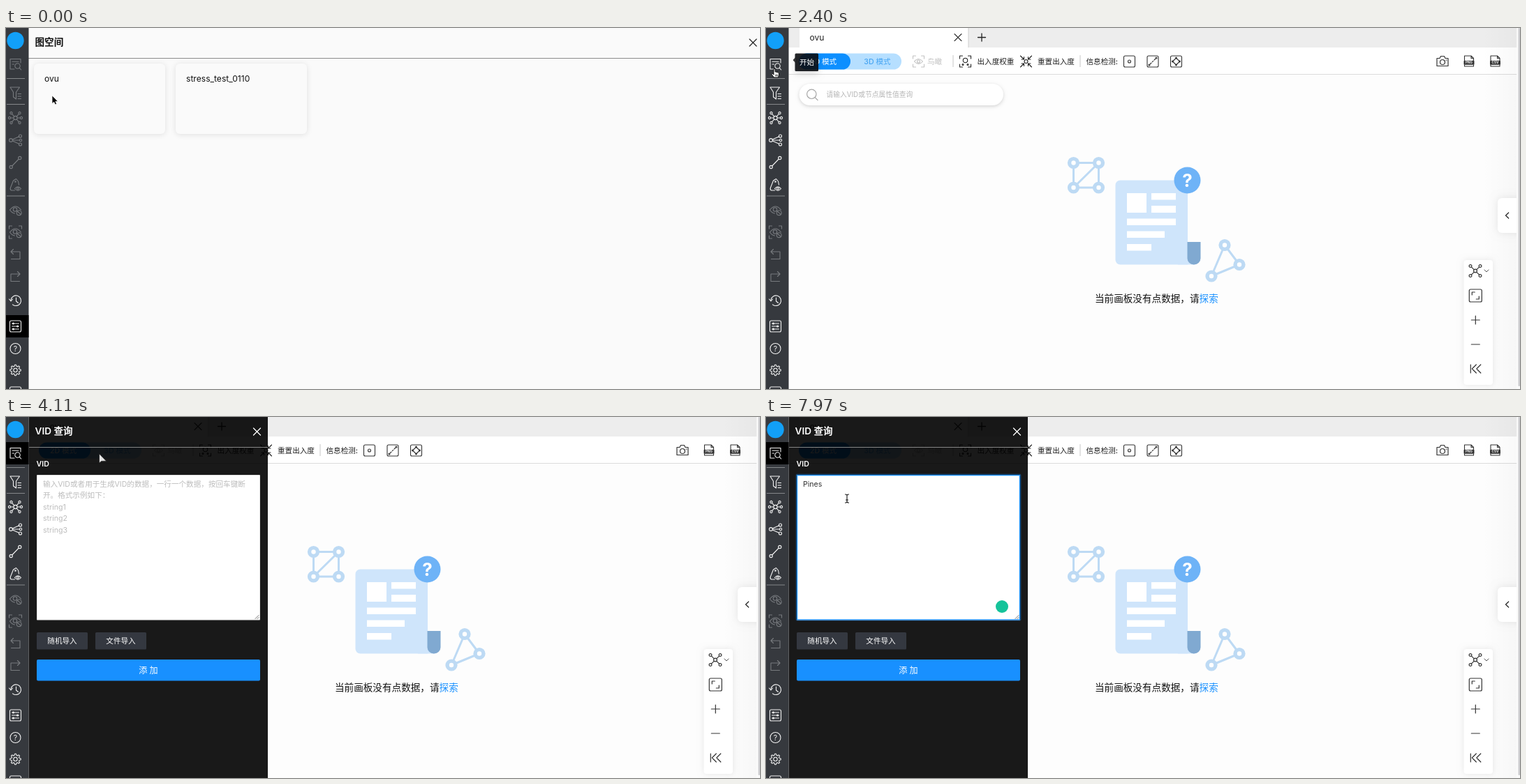
These frames come from a looping animation (1080x518 px, 8000 ms). An HTML page with a canvas:

```html
<!DOCTYPE html>
<html lang="zh-CN">
<head>
<meta charset="utf-8">
<title>图空间</title>
<style>
  html, body { margin: 0; width: 100%; height: 100%; overflow: hidden; background: #fdfdfd; }
  canvas { display: block; width: 1080px; height: 518px; }
</style>
</head>
<body>
<canvas id="stage"></canvas>
<script>
const W = 1080, H = 518, LOOP = 8000;
const canvas = document.getElementById('stage');
const dpr = window.devicePixelRatio || 1;
canvas.width = W * dpr;
canvas.height = H * dpr;
const g = canvas.getContext('2d');

const FAMILY = 'Inter, "Noto Sans CJK SC", "Noto Sans CJK", sans-serif';
const BLUE = '#1890ff', SIDE = '#36393e', INK = '#222';
const SPACE = 'ovu', WORD = 'Pines';
const KEYS = [5900, 6060, 6240, 6420, 6680];
const ENTER = 7270;

const clamp = v => Math.max(0, Math.min(1, v));
const span = (t, a, b) => clamp((t - a) / (b - a));
const ease = p => p * p * (3 - 2 * p);
const mix = (a, b, p) => a + (b - a) * p;

function fill(x, y, w, h, color, r = 0) {
  g.fillStyle = color;
  g.beginPath();
  g.roundRect(x, y, w, h, r);
  g.fill();
}

function shadowBox(x, y, w, h, color, r, alpha, blur, dy = 0) {
  g.save();
  g.shadowColor = `rgba(0,0,0,${alpha})`;
  g.shadowBlur = blur * dpr;
  g.shadowOffsetY = dy * dpr;
  fill(x, y, w, h, color, r);
  g.restore();
}

function text(s, x, y, size, color, weight = 400, align = 'left') {
  g.font = `${weight} ${size}px ${FAMILY}`;
  g.fillStyle = color;
  g.textAlign = align;
  g.textBaseline = 'alphabetic';
  g.fillText(s, x, y + size * 0.36);
}

function line(d, x, y, color, width = 1.1, inside) {
  const p = new Path2D(d);
  g.save();
  g.translate(x, y);
  g.lineCap = g.lineJoin = 'round';
  if (inside) {
    g.fillStyle = inside;
    g.fill(p);
  }
  g.strokeStyle = color;
  g.lineWidth = width;
  g.stroke(p);
  g.restore();
}

function disc(x, y, r, color) {
  g.fillStyle = color;
  g.beginPath();
  g.arc(x, y, r, 0, 7);
  g.fill();
}

const ring = (x, y, r) => `M${x - r} ${y}a${r} ${r} 0 1 0 ${2 * r} 0a${r} ${r} 0 1 0 ${-2 * r} 0`;
const box = (r, k = 2) => `M${-r + k} ${-r}H${r - k}Q${r} ${-r} ${r} ${-r + k}V${r - k}Q${r} ${r} ${r - k} ${r}` +
  `H${-r + k}Q${-r} ${r} ${-r} ${r - k}V${-r + k}Q${-r} ${-r} ${-r + k} ${-r}`;
const corners = (r, k) => `M${-r} ${-r + k}V${-r}H${-r + k}M${r - k} ${-r}H${r}V${-r + k}` +
  `M${r} ${r - k}V${r}H${r - k}M${-r + k} ${r}H${-r}V${r - k}`;

function spokes(ends, hub, tip) {
  return ring(0, 0, hub) + ends.map(([x, y]) => {
    const d = Math.hypot(x, y), a = hub / d, b = 1 - tip / d;
    return `M${x * a} ${y * a}L${x * b} ${y * b}` + ring(x, y, tip);
  }).join('');
}

function gear() {
  let d = '';
  for (let i = 0; i <= 96; i++) {
    const a = i / 96 * Math.PI * 2, r = 6.7 + 1.1 * Math.tanh(2 * Math.cos(a * 8));
    d += `${i ? 'L' : 'M'}${r * Math.cos(a)} ${r * Math.sin(a)}`;
  }
  return d + ring(0, 0, 2.7);
}

const EYE = 'M-8 0Q0 -10 8 0M-8 0Q-5 4.5 -1 5' + ring(-0.5, -0.5, 2.7) + ring(5.2, 4.2, 3.4) + 'M2.8 2L7.6 6.4';
const CROSS = 'M-5 -5L5 5M5 -5L-5 5';
const PLUS = 'M-5.5 0H5.5M0 -5.5V5.5';
const NET = spokes([[-7, -7], [7, -7], [-7, 7], [7, 7]], 2.4, 1.9);

// [y, path, group]: 0 needs a space, 1 stays dim, 2 is always on
const ICONS = [
  [52, 'M-1.5 7H-7.5V-7.5H7.5V-2M-4.5 -3.7H4.5M-4.5 0H-2' + ring(3, 2.5, 3.7) + 'M5.6 5.2L8.2 8', 0],
  [93, 'M-7.5 -8H6L1 -1V9L-3 6V-1ZM3.5 1.5H8M3.5 5H8M3.5 8.5H8', 0],
  [129, spokes([[-6, -7], [6, -7], [-6, 7], [6, 7], [-8.5, 0], [8.5, 0]], 2.6, 1.6), 0],
  [161, ring(-6.5, 0, 2.4) + ring(7, -6, 2) + ring(7.5, 0, 1.7) + ring(7, 6, 2) +
    'M-4.3 -1L5.2 -5.2M-4.1 0H5.8M-4.3 1L5.2 5.2', 0],
  [193, ring(-6.3, 6.5, 2.1) + ring(6.3, -6.5, 2.1) + 'M-4.8 5L4.8 -5', 0],
  [225, 'M-1 8H-6Q-8 7 -7 4L-3 -6L1 -8.5L4 -5L5 0' + ring(0, -4.5, 0.8) +
    'M-1 5.5Q3.5 0 8 5.5Q3.5 11 -1 5.5' + ring(3.5, 5.5, 1.5), 0],
  [261, EYE, 1],
  [293, EYE + 'M-9 -5V-9H-5M5 -9H9V-5M-9 5V9H-5', 1],
  [325, 'M-3 -7.5L-6.5 -4L-3 -.5M-6.5 -4H6.5V6.5H-6', 1],
  [357, 'M3 -7.5L6.5 -4L3 -.5M6.5 -4H-6.5V6.5H6', 1],
  [391, 'M-6.5 -1A7.3 7.3 0 1 1 -4 5.8M-9 -2L-6.5 .8L-4 -2M1 -4V1L4 3.5', 2],
  [428, box(8, 2) + 'M-5 -4H5M-5 0H5M-5 4H5' + ring(-3, -4, 1) + ring(3, 0, 1) + ring(-3, 4, 1), 2],
  [460, ring(0, 0, 7.5), 2],
  [491, gear(), 2],
  [523, box(8, 2), 2]
];

function sidebar(ready, active) {
  fill(0, 0, 32.5, H, SIDE);
  if (active) fill(0, active - 16, 32.5, 32, '#000');
  disc(13.5, 18, 12.2, '#12a0f8');
  for (const y of [72.5, 109.5, 241]) fill(1, y - 0.5, 26, 1, '#85878a');
  for (const [y, d, group] of ICONS) {
    const on = group === 2 || (group === 0 && ready);
    line(d, 13.5, y, on ? '#f2f2f2' : '#777a7e', 1.1);
  }
  text('?', 13.5, 460, 10.5, '#f2f2f2', 400, 'center');
}

function spaceList() {
  fill(0, 0, W, H, '#fafafa');
  text('图空间', 41.5, 20, 13.6, '#111', 700);
  fill(32, 43, W - 32, 1, '#8c8c8c');
  line(CROSS, 1070, 21, '#222', 1.2);
  [[40, SPACE], [243, 'stress_test_0110']].forEach(([x, name]) => {
    shadowBox(x, 51, 188, 101, '#fafafa', 6, 0.11, 8, 1);
    text(name, x + 15, 73, 12.1, '#111');
  });
  sidebar(false, 428);
}

function nodes(points, edges) {
  const c = '#bddaf4';
  line(edges, 0, 0, c, 3);
  for (const [x, y] of points) {
    disc(x, y, 8.6, c);
    disc(x, y, 3.2, '#fff');
  }
}

function emptyArt() {
  nodes([[440.5, 193.5], [476.5, 193.5], [440.5, 229], [476.5, 229]],
    'M440.5 193.5H476.5V229H440.5ZM476.5 193.5L440.5 229');
  nodes([[657, 311.5], [678, 339.5], [638, 356]], 'M657 311.5L678 339.5L638 356Z');
  fill(500.5, 218.5, 103.5, 121, '#cfe5fb', [7, 0, 0, 7]);
  fill(590, 325, 23, 14.5, '#cfe5fb');
  fill(603.5, 307, 19, 32.5, '#80a9d1', [0, 0, 9, 9]);
  const rows = [[517, 237, 28, 28], [552, 237, 35, 9.5], [552, 255, 35, 10],
    [517, 273.5, 70, 9.5], [517, 291.5, 54, 9.5], [517, 310, 35, 9.5]];
  for (const r of rows) fill(...r, '#fff');
  disc(603.5, 218.5, 19, '#6eb3f7');
  text('?', 603.5, 218.5, 26, '#fff', 700, 'center');
  text('当前画板没有点数据，请', 471, 388, 13.6, '#111', 500);
  text('探索', 620.6, 388, 13.6, BLUE, 500);
}

function fileIcon(x, label) {
  line('M-6.5 -1V-7.5H3L6.5 -4V-1M3 -7.5V-4H6.5M-6.5 5V7.5H6.5V5', x, 47.5, '#333');
  fill(x - 7.5, 46.8, 15, 6, '#333', 1);
  text(label, x, 49.8, 4.6, '#fff', 700, 'center');
}

function toolbar() {
  fill(32.5, 28, 1043, 38.5, '#fff');
  fill(32.5, 66, 1043, 1, '#dcdcdc');
  fill(47, 36.5, 147, 23, '#b6dfff', 11.5);
  fill(47, 36.5, 74, 23, '#0d8fff', 11.5);
  text('2D 模式', 82, 48, 10.6, '#fff', 500, 'center');
  text('3D 模式', 159.5, 48, 10.6, '#46a5f3', 500, 'center');
  const pale = '#c2c2c2';
  line(corners(8, 4) + 'M-6 0Q0 -7 6 0Q0 7 -6 0' + ring(0, 0, 2), 218.5, 48, pale);
  text('鸟瞰', 231, 48, 10.6, pale);
  fill(267.5, 39, 1, 17, '#c8c8c8');
  line(corners(8, 4) + ring(0, -1.5, 3.2) + ring(-3.5, 4.5, 1) + ring(3.5, 4.5, 1), 285.5, 48, INK);
  text('出入度权重', 302.5, 48, 10.6, INK, 500);
  line(ring(0, 0, 2.5) + 'M-8 -8L-3 -3M-3 -6.5V-3H-6.5M8 -8L3 -3M3 -6.5V-3H6.5' +
    'M-8 8L-3 3M-3 6.5V3H-6.5M8 8L3 3M3 6.5V3H6.5', 372.5, 48, INK);
  text('重置出入度', 389, 48, 10.6, INK, 500);
  fill(449.5, 39, 1, 17, '#c8c8c8');
  text('信息检测:', 458.5, 48, 10.6, INK, 500);
  line(box(8, 2) + ring(0, 0, 2), 520.5, 48, '#333');
  line(box(8, 2) + ring(-5, 5, 1) + ring(5, -5, 1) + 'M-3.5 3.5L-2 2M-.7 .7L.7 -.7M2 -2L3.5 -3.5', 554, 48, '#333');
  line(box(8, 2) + 'M0 -5L5 0L0 5L-5 0Z' + ring(0, -5, 0.9) + ring(0, 5, 0.9) + ring(-5, 0, 0.9) + ring(5, 0, 0.9), 587.5, 48, '#333');
  line('M-8 -4.5H-4L-2.5 -7.5H2.5L4 -4.5H8V6.5H-8Z' + ring(0, 1, 3.5) + 'M5 -2H6', 969, 48, '#333', 1.2);
  fileIcon(1007, 'PNG');
  fileIcon(1044.5, 'CSV');
}

function workspace(t) {
  const p = ease(span(t, 900, 1070));
  fill(0, 0, W, H, '#fdfdfd');
  fill(32.5, 0, 1043, 28, '#ededed');
  fill(48, 0, 241.5, 28, '#fff');
  fill(289.5, 0, 1, 28, '#d2d2d2');
  text(SPACE, 62.5, 13.5, 12.1, INK);
  line(CROSS, 275, 13.5, '#333', 1.1);
  line(PLUS, 309, 13.5, '#222', 1.3);
  toolbar();

  shadowBox(47.5, 80, 292.5, 31, '#fff', 15.5, 0.17, 5, 1.5);
  const sx = mix(65, 66, p);
  line(ring(-0.7, -0.7, 6.7) + 'M4.2 4.2L8 8', sx, 95.5, p < 1 ? '#c5c5c5' : '#a6a6a6', 1.2);
  text('请输入VID或节点属性值查询', 86.5, 95.7, 9.75, '#b5b5b5');
  emptyArt();

  const shade = g.createLinearGradient(1026, 0, 1075, 0);
  shade.addColorStop(0, 'rgba(0,0,0,0)');
  shade.addColorStop(1, `rgba(0,0,0,${0.022 * p})`);
  g.fillStyle = shade;
  g.fillRect(1026, 0, 49, H);
  const hx = mix(1057, 1048, p);
  g.save();
  g.beginPath();
  g.rect(1000, 200, 75, 140);
  g.clip();
  shadowBox(hx, 244, 40, 50, '#fff', 6, 0.09, 12);
  g.restore();
  line('M2.2 -4L-2 0L2.2 4', mix(1069, 1061.5, p), 269, '#222', 1.2);

  shadowBox(999.5, 333, 41.5, 179, '#fff', 4, 0.09, 9);
  line(NET, 1016, 348.5, '#333', 1.2);
  line('M-3 -1.5L0 1.5L3 -1.5', 1032, 348.5, '#555', 1);
  line(box(9, 2) + 'M-5 -1V-5H-1M5 1V5H1', 1016.3, 384, '#333', 1.2);
  line('M-6 0H6M0 -6V6', 1016.3, 419, '#333', 1.2);
  line('M-6 0H6', 1016.3, 454, '#333', 1.2);
  line('M-7 -6V6M1 -6L-5 0L1 6M7.5 -6L1.5 0L7.5 6', 1016.3, 489, '#333', 1.2);
  fill(1075.5, 0, 4.5, H, '#fafafa');
  fill(1077.5, 0, 2.5, 514, '#cdcdd0', 1);
}

function tooltip(alpha) {
  if (!alpha) return;
  g.save();
  g.globalAlpha = alpha;
  shadowBox(41.5, 36.5, 33.5, 25.5, 'rgba(12,14,18,.9)', 1.5, 0.12, 9, 5);
  line('M0 -3L-2.5 0L0 3Z', 41.5, 46, '#222', 0.5, '#222');
  text('开始', 48, 49.2, 10.6, '#fff');
  g.restore();
}

function menu() {
  shadowBox(32.5, 36.5, 230.5, 96.5, SIDE, 0, 0.15, 5, 1);
  ['VID 查询', 'Tag 查询', '子图查询'].forEach((s, i) => {
    const y = 52.5 + i * 32.6;
    if (i) fill(32.5, y - 16.5, 230.5, 1, '#1c1e21');
    text(s, 41.5, y, 12.1, '#fff', 500);
    line('M-2 -4L2 0L-2 4', 252, y, '#f0f0f0', 1.2);
  });
}

function button(s, x) {
  fill(x, 309, 73, 24.5, '#343840', 1.5);
  text(s, x + 36.5, 321.3, 10.6, '#fff', 500, 'center');
}

function caret(t, typed) {
  const events = [5080, ...KEYS, ENTER].filter(k => k <= t);
  if (!events.length) return;
  const since = t - events[events.length - 1];
  if (since % 1080 >= 540) return;
  g.font = `400 10.6px ${FAMILY}`;
  const second = t >= ENTER;
  const x = 53 + (second ? 0 : g.measureText(typed).width);
  fill(x, second ? 104.5 : 88, 1, 15, '#222');
}

function panel(t) {
  fill(32.5, 0, 342.5, H, 'rgba(0,0,0,.9)');
  fill(32.5, 43, 342.5, 1, '#858585');
  text('VID 查询', 41.5, 20.5, 13.6, '#fff', 600);
  line(CROSS, 359.5, 21, '#fff', 1.3);
  text('VID', 43.5, 67.5, 10.6, '#fff', 600);

  const hover = span(t, 4650, 4880), focus = span(t, 5060, 5150);
  if (focus) fill(42.5, 81.5, 323, 211, `rgba(24,144,255,${0.3 * focus})`, 2);
  fill(44, 83, 320, 208.5, '#d9d9d9', 1);
  if (hover) fill(44, 83, 320, 208.5, `rgba(24,144,255,${hover})`, 1);
  const edge = mix(0.7, 1.2, focus);
  fill(44 + edge, 83 + edge, 320 - 2 * edge, 208.5 - 2 * edge, '#fff');
  line('M0 5L5 0M3 5L5 3', 357, 284.5, '#666', 0.9);

  const typed = WORD.slice(0, KEYS.filter(k => k <= t).length);
  if (typed) {
    text(typed, 53, 95.7, 10.6, '#333');
    disc(338, 272, 9 * ease(span(t, 5960, 6300)), '#15c39a');
  } else {
    ['输入VID或者用于生成VID的数据，一行一个数据，按回车键断', '开。格式示例如下：', 'string1', 'string2', 'string3']
      .forEach((s, i) => text(s, 53, 95.7 + i * 16.65, 10.6, '#bcbcbc'));
  }
  caret(t, typed);

  button('随机导入', 44);
  button('文件导入', 128);
  fill(44, 348, 320, 30.5, BLUE, 2);
  text('添 加', 204, 363.3, 12.1, '#fff', 500, 'center');
}

function arrow(x, y, light) {
  line(light ? 'M0 0V13L3.2 10.4L10 10.2Z' : 'M0 0V11.5L2.7 9.2L4.5 13L6.6 12L4.9 8.4H8.3Z',
    x, y, light ? '#222' : '#fff', 0.8, light ? '#e4e4e4' : '#000');
}

function hand(x, y) {
  line('M-1 7V1Q0 -.8 1.1 1V4.8L5 5.6Q6.8 6 6.6 8L5.6 13H-.5L-3.8 8.6Q-3.6 6.7 -2 7.7L-1 8.7ZM2 9V11M4 9V11', x, y, '#111', 1, '#fff');
}

function ibeam(x, y) {
  const d = 'M-2.5 -6Q0 -6 0 -4.5Q0 -6 2.5 -6M0 -4.5V4.5M-2.5 6Q0 6 0 4.5Q0 6 2.5 6M-1.5 2H1.5';
  line(d, x, y, '#fff', 2.2);
  line(d, x, y, '#111', 1.1);
}

function pointer(t) {
  if (t < 600) return arrow(66, 97);
  if (t < 1780) return hand(66.5, 98);
  if (t < 3420) {
    const p = ease(span(t, 1780, 2250));
    const x = mix(66.5, 12, p), y = mix(98, 58, p);
    return x < 32 || p === 0 ? hand(x, y) : arrow(x, y);
  }
  if (t < 4470) {
    const p = ease(span(t, 3400, 3820));
    const x = mix(12, 133.5, p), y = mix(58, 53, p);
    return x < 32 ? hand(x, y) : arrow(x, y, true);
  }
  const p = ease(span(t, 4450, 4880));
  const x = mix(133.5, 116, p), y = mix(53, 117, p);
  return y < 83 ? arrow(x, y, true) : ibeam(x, y);
}

function draw(t) {
  g.setTransform(dpr, 0, 0, dpr, 0, 0);
  if (t < 900) {
    spaceList();
  } else {
    workspace(t);
    if (t >= 4110) panel(t);
    sidebar(true, t >= 2940 ? 52 : 0);
    if (t < 2940) tooltip(span(t, 2230, 2400));
    else if (t < 4110) menu();
  }
  pointer(t);
}

const start = performance.now();
function tick() {
  draw((performance.now() - start) % LOOP);
  requestAnimationFrame(tick);
}
tick();
</script>
</body>
</html>
```
